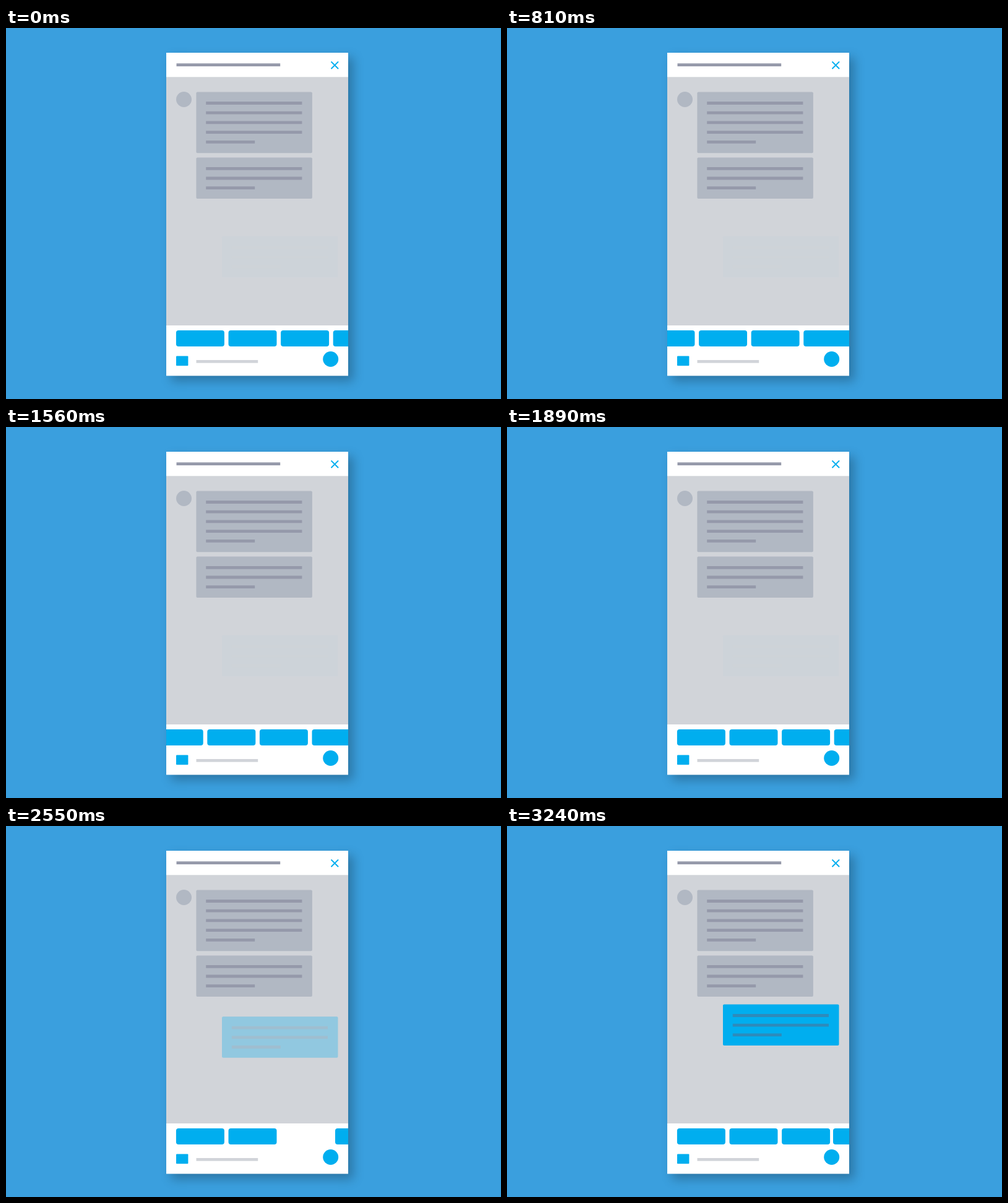
Write an HTML page with a canvas that moves like this. It is 800 px wide and 600 px high and loops after 8000 ms.

```html
<!DOCTYPE html>
<html lang="en">
<head>
<meta charset="utf-8">
<title>Chat quick replies</title>
<style>
  html, body { margin: 0; width: 100%; height: 100%; overflow: hidden; background: #3a9fde; }
  canvas { display: block; width: 800px; height: 600px; }
</style>
</head>
<body>
<canvas id="stage" width="800" height="600"></canvas>
<script>
const ctx = document.getElementById('stage').getContext('2d');
const LOOP = 8000, TICK = 30;
const BLUE = '#00aeef', PANEL = '#d1d4d9', BUBBLE = '#b1b8c3', INK = '#9599aa';
const PITCH = 84.6;

const span = (t, from, to) => Math.min(1, Math.max(0, (t - from) / (to - from)));
const smooth = p => p * p * (3 - 2 * p);
const backIn = p => p * p * (2.70158 * p - 1.70158);
const mix = (a, b, p) => a + (b - a) * p;

function box(x, y, w, h, color, r = 0) {
  ctx.fillStyle = color;
  ctx.beginPath();
  ctx.roundRect(x, y, w, h, r);
  ctx.fill();
}

function dot(x, y, r, color) {
  ctx.fillStyle = color;
  ctx.beginPath();
  ctx.arc(x, y, r, 0, Math.PI * 2);
  ctx.fill();
}

function bubble(x, y, h, lines, color, ink) {
  box(x, y, 187.5, h, color, 2);
  for (let i = 0; i < lines; i++) {
    box(x + 15.8, y + 15.5 + i * 15.7, i < lines - 1 ? 155.2 : 79, 4.8, ink);
  }
}

function phone() {
  ctx.fillStyle = '#3a9fde';
  ctx.fillRect(0, 0, 800, 600);
  ctx.save();
  ctx.shadowColor = 'rgba(0,0,0,.26)';
  ctx.shadowBlur = 16;
  ctx.shadowOffsetX = ctx.shadowOffsetY = 8;
  box(259, 40, 294, 522.6, '#fff');
  ctx.restore();
  box(259, 79.3, 294, 401.7, PANEL);

  box(275.5, 57.2, 167.7, 4.8, INK);
  ctx.strokeStyle = BLUE;
  ctx.lineWidth = 2;
  ctx.beginPath();
  ctx.moveTo(525.5, 54.4);
  ctx.lineTo(537.1, 66);
  ctx.moveTo(537.1, 54.4);
  ctx.lineTo(525.5, 66);
  ctx.stroke();

  dot(287.5, 115.5, 12.5, BUBBLE);
  bubble(307.4, 103.6, 98.6, 5, BUBBLE, INK);
  bubble(307.4, 209.4, 66.5, 3, BUBBLE, INK);

  box(275, 530.6, 19.4, 15.6, BLUE, 1);
  box(307.5, 536.9, 99.7, 4.8, PANEL);
  dot(524.7, 535.5, 12.5, BLUE);
}

function replies(t) {
  const swipe = 136.5 * (t < 880 ? smooth(span(t, 0, 880)) : 1 - smooth(span(t, 880, 1890)));
  const shift = PITCH * backIn(span(t, 2250, 2760));
  const picked = 1 - span(t, 2220, 2370);

  ctx.save();
  ctx.beginPath();
  ctx.rect(259, 481, 294, 50);
  ctx.clip();
  const chip = x => box(x, 489, 78, 26, BLUE, 4);
  for (const i of [0, 1, 3]) chip(274.9 + i * PITCH - swipe - (i === 3 ? shift : 0));
  chip(611.6 - swipe * 0.987 - shift);
  ctx.globalAlpha = picked;
  if (picked > 0) chip(274.9 + 2 * PITCH - swipe);
  ctx.restore();
}

function answer(t) {
  const rise = smooth(span(t, 2280, 2760));
  ctx.save();
  const alpha = mix(mix(0.02, 0.5, rise), 1, span(t, 3120, 3240));
  const blend = (...rgb) => {
    const base = [209, 212, 217];
    return `rgb(${rgb.map((c, i) => Math.round(mix(base[i], c, alpha)))})`;
  };
  bubble(349, mix(336.8, 288.6, rise), 66.5, 3, blend(0, 174, 239), blend(45, 139, 187));
  ctx.restore();
}

function draw(now) {
  const t = Math.floor((now % LOOP) / TICK + 1e-6) * TICK;
  phone();
  answer(t);
  replies(t);
}

let start;
function frame(now) {
  start ??= now;
  draw(Math.max(0, now - start));
  requestAnimationFrame(frame);
}
draw(0);
requestAnimationFrame(frame);
</script>
</body>
</html>
```
